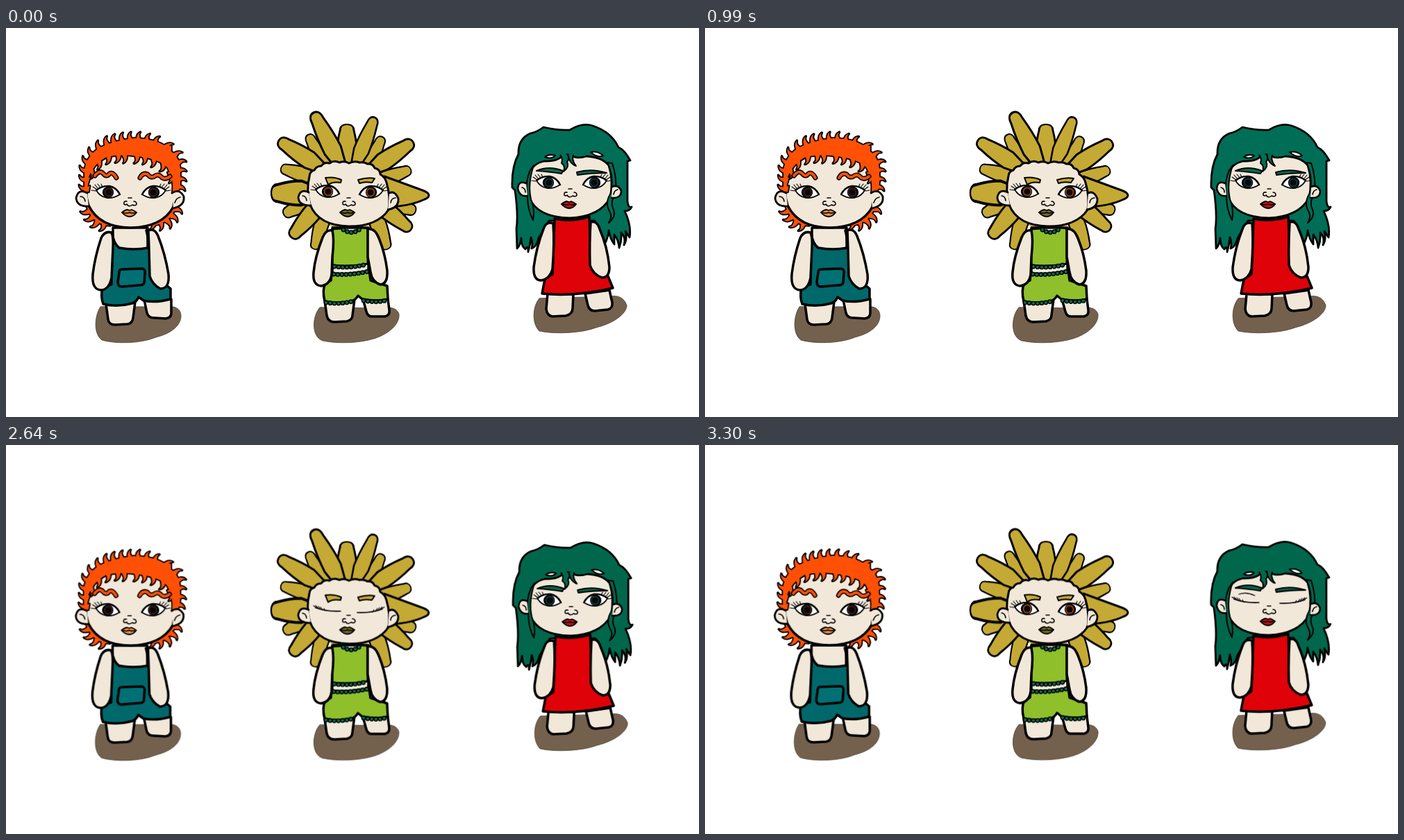
An HTML page without scripts for the animation above (3630 ms loop, 998 by 561 pixels).

```html
<!DOCTYPE html>
<html lang="en">
<head>
<meta charset="utf-8">
<title>Three blinking dolls</title>
<style>
html, body { margin: 0; width: 100%; height: 100%; overflow: hidden; background: #fff; }
svg { display: block; width: 100vw; height: 100vh; stroke: #000; stroke-width: 3.5; stroke-linejoin: round; stroke-linecap: round; }
.skin { fill: #f2e8da; }
.shade { fill: #74614d; stroke: #4a3e32; stroke-width: .8; }
.line { fill: none; }
.thin { stroke-width: 1.6; }
.fine { fill: none; stroke-width: 1.1; }
.rim { fill: #000; stroke-width: 3.6; }
.fill { stroke: none; }
.orange { fill: #ff5006; }
.teal { fill: #00686b; }
.pocket { fill: #007074; }
.gold { fill: #c4a935; }
.lime { fill: #8fc02b; }
.green { fill: #006e56; animation: tint 3.63s step-end infinite; }
.red { fill: #df0209; }
.lace { fill: none; stroke-width: 6.8; stroke-dasharray: 0 6; }
.lace + .lace { stroke: #0a6b50; stroke-width: 4; }
.wave { fill: none; stroke-width: 7; }
.wave + .wave { stroke: #ff5006; stroke-width: 3.8; }

/* eleven beats of 330 ms */
.doll, .open, .shut { animation: 3.63s step-end infinite; }
.shut { visibility: hidden; }
#ann { animation-name: swayA; }
#bea { animation-name: swayB; }
#cat { animation-name: swayC; }
#ann .open { animation-name: hideA; } #ann .shut { animation-name: showA; }
#bea .open { animation-name: hideB; } #bea .shut { animation-name: showB; }
#cat .open { animation-name: hideC; } #cat .shut { animation-name: showC; }
@keyframes hideA { 45.4545% { visibility: hidden } 54.5454% { visibility: visible } }
@keyframes showA { 45.4545% { visibility: visible } 54.5454% { visibility: hidden } }
@keyframes hideB { 72.7272% { visibility: hidden } 81.8181% { visibility: visible } }
@keyframes showB { 72.7272% { visibility: visible } 81.8181% { visibility: hidden } }
@keyframes hideC { 18.1818%, 90.909% { visibility: hidden } 27.2727%, 100% { visibility: visible } }
@keyframes showC { 18.1818%, 90.909% { visibility: visible } 27.2727%, 100% { visibility: hidden } }
@keyframes tint {
  0%, 27.2727%, 54.5454%, 81.8181%, 100% { fill: #006e56 }
  18.1818%, 45.4545%, 72.7272%, 90.909% { fill: #00674c }
}
@keyframes swayA {
  0%, 27.2727%, 54.5454%, 81.8181%, 100% { transform: none }
  18.1818%, 90.909% { transform: translate(-.7px, .8px) }
  45.4545% { transform: translate(-.8px, 1.2px) }
  72.7272% { transform: translate(-.5px, 1.2px) }
}
@keyframes swayB {
  0%, 27.2727%, 54.5454%, 81.8181%, 100% { transform: none }
  18.1818%, 90.909% { transform: translate(0, .3px) }
  45.4545% { transform: translate(0, 1px) }
  72.7272% { transform: translate(-.2px, .6px) }
}
@keyframes swayC {
  0%, 27.2727%, 54.5454%, 81.8181%, 100% { transform: none }
  18.1818%, 90.909% { transform: translate(-.2px, .2px) }
  45.4545% { transform: translate(.6px, 1px) }
  72.7272% { transform: translate(1.2px, 1.1px) }
}
</style>
</head>
<body>
<svg viewBox="0 0 998 561" preserveAspectRatio="none">
<defs>
  <path id="curl" d="M-4.500 5C-4 -1 -4.500 -8 3 -10.500C-1 -7 1 -3 4 5Z"/>
  <path id="petal" d="M0 0C0 -6 5 -9 12 -9Q36 -13 58 -13L90 -6V6L58 13Q36 13 12 9C5 9 0 6 0 0Z"/>
  <g id="eye">
    <path class="thin" fill="#fff" d="M-17 -3Q-8 -10 2 -9Q12 -7 17 3Q8 9 -2 8Q-12 6 -17 -3Z"/>
    <circle r="8.200" fill="#000" stroke="none"/>
    <circle cx="1" r="6.400" fill="currentColor" stroke="none"/>
    <circle cx="1" r="4.600" fill="#0a0606" stroke="none"/>
    <path class="line" stroke-width="2.400" d="M-17 -3Q-8 -10 2 -9Q12 -7 17 3"/>
    <path class="fine" d="M-18 -2l-6 -1M-16 -4l-6 -4M-14 -5l-5 -6M-11 -7l-4 -5M-8 -8l-2 -4"/>
  </g>
  <g id="lid">
    <path class="line thin" d="M-18 -2Q-2 4 18 3"/>
    <path class="fine" d="M-17 -2l-4 -3M-14 -1l-4 -4M-11 0l-3 -4M-8 1l-3 -4M-4 2l-2 -3"/>
  </g>
  <path id="crease" class="fine" d="M-11 -9Q0 -13 12 -7"/>
  <path id="nose" class="line thin" d="M-3 -7h5M-5 -2Q-10 -3 -9 2Q-7 4 -5 2Q-2 7 3 3Q8 5 9 2Q9 -2 5 -2"/>
  <g id="lips" stroke-width="1.800">
    <path d="M-11 -1Q-6 -5 -3 -5L0 -4L3 -5Q6 -4 10 -1Q6 5 0 5Q-6 5 -11 -1Z"/>
    <path class="line thin" d="M-11 -1Q-4 1 0 -1Q4 1 10 -1"/>
  </g>
  <path id="browL" d="M128 213Q135 204 140 210Q145 216 149 210Q154 207 159 216"/>
  <path id="browR" d="M193 216Q197 208 204 211Q209 218 215 213Q220 210 225 216Q230 219 236 214"/>
  <path id="hem" d="M473 344Q495 347 519 341"/>
  <path id="waist" d="M472 355Q495 357 522 351"/>
  <path id="cuffL" d="M461 396Q480 399 500 394"/>
  <path id="cuffR" d="M515 393Q535 397 550 392"/>
  <path id="collar" d="M486 291Q498 299 510 290"/>
  <g id="cap">
    <path d="M113 236L113 205Q116 185 134 173Q155 162 185 159Q215 160 229 170L238 170L238 178Q252 188 251 210Q253 225 247 238L240 236Q242 220 233 202Q222 189 190 185Q165 181 145 186Q127 195 119 215L117 236Z"/>
    <use href="#curl" transform="translate(115 231)rotate(-80)"/>
    <use href="#curl" transform="translate(115 218)rotate(-75)"/>
    <use href="#curl" transform="translate(115 205)rotate(-70)"/>
    <use href="#curl" transform="translate(118 193)rotate(-58)"/>
    <use href="#curl" transform="translate(125 182)rotate(-45)"/>
    <use href="#curl" transform="translate(135 173)rotate(-30)"/>
    <use href="#curl" transform="translate(146 167)rotate(-20)"/>
    <use href="#curl" transform="translate(156 164)rotate(-12)"/>
    <use href="#curl" transform="translate(168 162)rotate(-14)"/>
    <use href="#curl" transform="translate(180 161)rotate(-16)"/>
    <use href="#curl" transform="translate(192 161)rotate(-8)"/>
    <use href="#curl" transform="translate(204 163)rotate(2)"/>
    <use href="#curl" transform="translate(216 166)rotate(14)"/>
    <use href="#curl" transform="translate(231 172)rotate(50)"/>
    <use href="#curl" transform="translate(244 184)rotate(50)"/>
    <use href="#curl" transform="translate(249 195)rotate(62)"/>
    <use href="#curl" transform="translate(249 207)rotate(72)"/>
    <use href="#curl" transform="translate(249 219)rotate(84)"/>
    <use href="#curl" transform="translate(248 230)rotate(100)"/>
    <use href="#curl" transform="translate(122 206)rotate(160)"/>
    <use href="#curl" transform="translate(133 193)rotate(170)"/>
    <use href="#curl" transform="translate(147 186)rotate(180)"/>
    <use href="#curl" transform="translate(161 184)rotate(184)"/>
    <use href="#curl" transform="translate(170 184)rotate(170)"/>
    <use href="#curl" transform="translate(188 185)rotate(184)"/>
    <use href="#curl" transform="translate(199 186)rotate(176)"/>
    <use href="#curl" transform="translate(212 190)rotate(180)"/>
    <use href="#curl" transform="translate(226 197)rotate(190)"/>
    <use href="#curl" transform="translate(237 213)rotate(176)"/>
  </g>
  <g id="nape">
    <path d="M114 250Q122 284 150 285L160 270L118 240ZM246 252Q240 282 210 285L205 270L240 245Z"/>
    <use href="#curl" transform="translate(118 264)rotate(-110)"/>
    <use href="#curl" transform="translate(123 273)rotate(-125)"/>
    <use href="#curl" transform="translate(130 280)rotate(-145)"/>
    <use href="#curl" transform="translate(140 283)rotate(-165)"/>
    <use href="#curl" transform="translate(244 262)rotate(105)"/>
    <use href="#curl" transform="translate(239 272)rotate(120)"/>
    <use href="#curl" transform="translate(232 279)rotate(140)"/>
    <use href="#curl" transform="translate(222 281)rotate(165)"/>
    <use href="#curl" transform="translate(212 280)rotate(185)"/>
  </g>
</defs>

<g id="ann" class="doll">
  <path class="shade" d="M136 402C128 414 125 440 138 450C158 456 195 455 216 446C240 440 252 428 252 415C252 405 243 400 232 402Z"/>
  <path class="skin" d="M144 398L147 420Q148 428 157 428L175 427Q182 426 183 418L186 395ZM199 392L203 411Q205 418 213 418L230 419Q238 418 238 411L238 391Z"/>
  <path class="skin" d="M154 288H204V325H154Z"/>
  <path class="teal" d="M153 296Q155 311 163 317Q184 321 205 317Q205 302 202 292L208 291L209 352L237 376L237 391Q215 397 198 393L191 388Q188 395 182 397Q160 403 140 398Q136 388 139 373L152 370Z"/>
  <path class="pocket" d="M167 348L195 347Q201 347 200 354L199 367Q198 371 192 371L167 373Q161 373 161 366L163 353Q163 348 167 348Z"/>
  <path class="skin" d="M152 295Q142 292 137 303Q128 330 125 355Q123 378 138 378Q149 376 152 360L154 318Q155 302 152 295ZM205 292Q214 288 219 300Q229 325 234 355Q236 376 222 376Q211 370 207 358L206 320Z"/>
  <use href="#nape" class="rim"/>
  <use href="#nape" class="fill orange"/>
  <path class="skin" d="M118 215Q112 235 119 256Q135 288 180 288Q225 287 241 258Q245 235 238 210Q225 180 180 180Q132 180 118 215Z"/>
  <use href="#cap" class="rim"/>
  <use href="#cap" class="fill orange"/>
  <path class="skin" stroke-width="2.800" d="M117 238Q104 231 101 245Q102 258 119 257M239 238Q250 231 256 243Q258 256 241 260"/>
  <path class="line thin" d="M107 243Q113 243 114 250M251 244Q245 245 243 252"/>
  <g><use href="#browL" class="wave"/><use href="#browL" class="wave"/></g>
  <g><use href="#browR" class="wave"/><use href="#browR" class="wave"/></g>
  <g class="open" color="#38201b">
    <use href="#eye" x="147" y="237"/>
    <use href="#eye" transform="translate(213 237)scale(-1 1)"/>
  </g>
  <g class="shut">
    <use href="#lid" x="147" y="237"/>
    <use href="#crease" x="147" y="237"/>
    <use href="#lid" transform="translate(212 236)scale(-1 1)"/>
  </g>
  <use href="#nose" x="179" y="252"/>
  <use href="#lips" x="178" y="267" fill="#e08a45"/>
</g>

<g id="bea" class="doll">
  <path class="shade" d="M452 403C441 415 439 445 456 451C480 456 510 454 530 448C555 440 567 425 566 413C563 402 550 402 540 404Z"/>
  <path class="skin" d="M459 394L462 415Q464 424 473 424L491 423Q499 421 499 414L502 391ZM514 391L519 409Q521 417 529 416L546 416Q553 414 552 407L550 391Z"/>
  <ellipse class="fill gold" cx="494" cy="238" rx="64" ry="52"/>
  <g class="gold" stroke-width="2.600">
    <use href="#petal" transform="translate(491 139)rotate(90)scale(.7 1.100)"/>
    <use href="#petal" transform="translate(435 154)rotate(62)scale(.8)"/>
    <use href="#petal" transform="translate(542 157)rotate(115)scale(.8)"/>
    <use href="#petal" transform="translate(396 202)rotate(16)scale(.7 .85)"/>
    <use href="#petal" transform="translate(583 204)rotate(160)scale(.7 .85)"/>
    <use href="#petal" transform="translate(400 269)rotate(-28)scale(.7 .9)"/>
    <use href="#petal" transform="translate(590 264)rotate(197)scale(.7 .9)"/>
    <use href="#petal" transform="translate(444 319)rotate(-74)scale(.7 .8)"/>
    <use href="#petal" transform="translate(549 319)rotate(250)scale(.7 .9)"/>
  </g>
  <g class="gold" stroke-width="3">
    <use href="#petal" transform="translate(443 122)rotate(63)scale(1.050 1)"/>
    <use href="#petal" transform="translate(531 129)rotate(112)scale(.9 .85)"/>
    <use href="#petal" transform="translate(393 162)rotate(33)scale(.9 1)"/>
    <use href="#petal" transform="translate(586 164)rotate(146)scale(.9 1)"/>
    <use href="#petal" transform="translate(382 238)scale(.75 1.350)"/>
    <use href="#petal" transform="translate(411 302)rotate(-50)scale(.85 1)"/>
    <use href="#petal" transform="translate(583 291)rotate(219)scale(.85 .95)"/>
    <path d="M609 241Q609 237 597 233L545 214V258Q580 258 603 247Q609 245 609 241Z"/>
  </g>
  <path class="skin" d="M470 288H522V360H470Z"/>
  <path class="lime" d="M469 354Q495 356 523 350L525 364L549 372L550 391Q535 395 513 391L507 386Q503 393 497 394Q475 398 459 394Q455 378 460 368L468 364Z"/>
  <path class="lime" stroke-width="3" d="M470 290L483 289Q497 299 512 288L521 289L521 340Q495 345 470 342Z"/>
  <g><use href="#hem" class="lace"/><use href="#hem" class="lace"/></g>
  <g><use href="#waist" class="lace"/><use href="#waist" class="lace"/></g>
  <g><use href="#cuffL" class="lace"/><use href="#cuffL" class="lace"/></g>
  <g><use href="#cuffR" class="lace"/><use href="#cuffR" class="lace"/></g>
  <g><use href="#collar" class="lace"/><use href="#collar" class="lace"/></g>
  <path class="skin" d="M470 292Q461 290 456 302Q445 330 443 352Q441 371 454 372Q467 370 469 355L470 330Q473 305 470 292ZM521 290Q531 288 537 303Q546 325 549 350Q550 369 539 370Q527 366 525 352L521 330Z"/>
  <path class="skin" stroke-width="3" d="M437 214q0 -7 7 -9q3 -6 10 -6q4 -6 12 -4q7 -5 14 -1q8 -3 14 1q8 -4 15 -1q8 -1 11 2q8 -1 11 6q8 2 8 9q7 4 9 12Q554 243 551 262Q535 286 494 286Q450 285 438 255Q432 233 437 214Z"/>
  <path class="skin" stroke-width="2.800" d="M436 237Q424 231 421 244Q421 256 439 256M552 238Q560 234 565 246Q566 259 550 262"/>
  <path class="line thin" d="M427 242Q432 242 433 249M561 245Q555 245 554 252"/>
  <path class="gold" stroke-width="2" d="M460 216Q473 214 483 219L482 223Q471 221 464 226ZM507 219Q520 215 531 217L527 223Q517 221 509 224Z"/>
  <g class="open" color="#8f4218">
    <use href="#eye" x="463" y="236"/>
    <use href="#eye" transform="translate(526 237)scale(-1 1)"/>
  </g>
  <g class="shut">
    <use href="#lid" x="464" y="236"/>
    <use href="#lid" transform="translate(524 238)scale(-1 1)"/>
  </g>
  <use href="#nose" x="494" y="252"/>
  <use href="#lips" x="492" y="267" fill="#6d662c"/>
</g>

<g id="cat" class="doll">
  <path class="shade" d="M768 390C758 402 757 426 768 437C790 442 830 440 850 432C875 426 894 412 894 400C890 388 880 385 870 387Z"/>
  <path class="green" stroke-width="2.800" d="M774 143Q765 150 755 152Q737 160 738 182Q728 200 729 230L733 234Q738 270 735 290L736 318Q741 313 742 303Q742 315 748 319Q752 312 752 323Q755 312 756 302Q759 310 757 318Q764 316 767 303L782 278H848L862 312Q868 300 868 292Q870 304 876 312L876 298Q882 305 883 317Q887 306 886 295Q893 302 890 313Q895 305 892 293L898 302Q901 285 891 264Q898 264 901 258Q896 260 895 250L895 192L899 191Q891 176 882 172Q872 150 845 141Q830 136 812 147Q795 148 774 143Z"/>
  <path class="skin" d="M780 383L778 405Q779 415 787 416L806 415Q816 413 816 404L817 384ZM834 383L838 400Q840 408 848 408L867 406Q874 404 873 396L869 378Z"/>
  <path class="red" d="M790 275Q815 280 840 272L843 342L867 358L874 375Q820 388 772 383L776 362L787 355Z"/>
  <path class="skin" d="M788 282Q778 278 774 290Q764 315 760 345Q759 364 771 364Q783 362 787 348Q790 310 788 282ZM842 280Q851 277 855 290Q866 315 869 345Q869 360 858 360Q845 355 841 342Q840 310 842 280Z"/>
  <path class="skin" stroke-width="2.800" d="M754 212Q757 196 775 192Q796 193 803 182L812 182Q820 190 836 185Q858 186 868 198Q875 220 870 245Q855 272 812 274Q765 273 754 245Q750 228 754 212Z"/>
  <path class="green" stroke-width="2" d="M805 179Q814 186 808 193Q812 200 803 207Q806 199 800 195Q803 188 796 180ZM809 180Q810 195 821 199Q813 189 818 181Z"/>
  <path class="green" stroke="none" d="M794 174H821V184Q808 178 794 184Z"/>
  <path class="green" stroke-width="2" d="M755 205Q747 222 751 243Q751 262 759 277Q762 262 756 247Q751 225 760 198ZM866 194Q876 215 871 238Q862 252 869 264Q874 272 868 281Q880 271 874 260Q870 250 878 238Q880 215 873 195Z"/>
  <path class="skin" stroke-width="2.600" d="M749 224Q738 219 737 232Q740 244 751 242M873 229Q882 225 886 235Q886 246 872 245"/>
  <path class="line thin" d="M743 230Q748 231 748 237M881 233Q876 234 875 240"/>
  <path fill="#fff" stroke-width="2" d="M776 186Q782 181 791 184Q785 190 776 186ZM842 179Q852 177 860 184Q852 188 842 179Z"/>
  <path class="green" stroke-width="2" d="M764 206Q782 198 802 206L800 210Q780 207 764 206ZM822 208Q843 202 865 209Q842 209 823 212Z"/>
  <g class="open" color="#003d42">
    <use href="#eye" x="781" y="223"/>
    <use href="#eye" transform="translate(848 223)scale(-1 1)"/>
  </g>
  <g class="shut">
    <use href="#lid" x="780" y="224"/>
    <use href="#crease" x="780" y="224"/>
    <use href="#lid" transform="translate(846 225)scale(-1 1)"/>
  </g>
  <use href="#nose" x="813" y="239"/>
  <use href="#lips" x="811" y="255" fill="#b5121b"/>
</g>
</svg>
</body>
</html>
```
